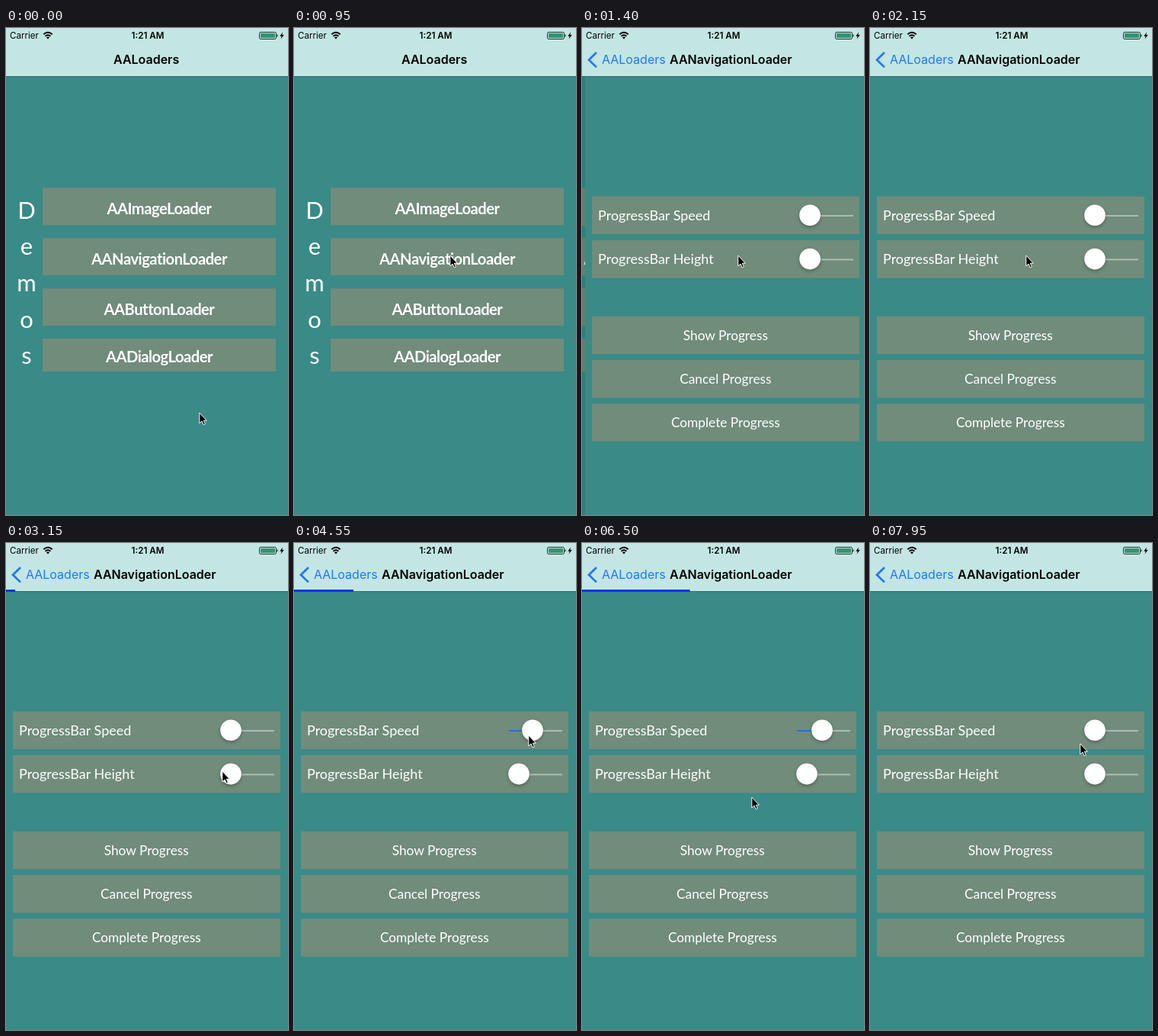
Animation of 370 by 638 pixels, one loop 8000 ms. Source, as an HTML page:

```html
<!DOCTYPE html>
<html lang="en">
<head>
<meta charset="utf-8">
<title>AALoaders</title>
<style>
  html, body { margin: 0; height: 100%; overflow: hidden; background: #3a8a88; }
  svg { display: block; width: 100vw; height: 100vh; }
  text { font: 16px Inter, sans-serif; }
  .mid { text-anchor: middle; }
  .bold { font-weight: 600; }
  .status { font-size: 11.6px; }
  .link { fill: #1c78f4; }
  .panel { fill: #718c7a; }
  .label { font: 18px Lato, sans-serif; fill: #fff; }
  .action { font-size: 17.3px; }
  .demo { font: 700 20.2px Lato, sans-serif; letter-spacing: -.5px; fill: #fff; }
  .letter { font: 400 31px Lato, sans-serif; fill: #fff; }
  .thumb { fill: #fff; filter: drop-shadow(0 2px 2px rgba(0, 0, 0, .28)); }
</style>
</head>
<body>
<svg viewBox="0 0 370 638">
  <rect width="370" height="638" fill="#3a8a88"/>
  <g id="home"></g>
  <rect id="dim" y="63" width="370" height="575"/>
  <g id="detail"><rect y="63" width="370" height="575" fill="#3a8a88"/></g>

  <rect width="370" height="63" fill="#c3e6e4"/>
  <rect y="63" width="370" height="1" fill="#356f6d"/>
  <rect id="bar" y="61" height="3" fill="#0936ea"/>

  <text class="status" x="5" y="14">Carrier</text>
  <path d="M49.3 8.3Q55 3.3 60.7 8.3M51.5 10.7Q55 7.7 58.5 10.7" fill="none" stroke="#000" stroke-width="1.8"/>
  <path d="M55 14.4L52.9 12.2Q55 10.6 57.1 12.2Z"/>
  <text class="status bold mid" x="186" y="14">1:21 AM</text>
  <rect x="332.5" y="5.5" width="22" height="9" rx="1.8" fill="none" stroke="#1c2d2b"/>
  <rect x="334" y="7" width="19" height="6" rx=".6" fill="#36936f"/>
  <path d="M355.5 8.3Q358 10 355.5 11.7Z"/>
  <path d="M363 5.5L359.3 10.7H361.6L360.6 14.5L364.7 9.1H362.3Z"/>

  <g id="back" class="link">
    <path d="M19 32L9 41.7L19 51.4" fill="none" stroke="#1c78f4" stroke-width="2.7"/>
    <text id="backText" y="47">AALoaders</text>
  </g>
  <text id="oldTitle" class="bold" y="47">AALoaders</text>
  <text id="newTitle" class="bold" y="47">AANavigationLoader</text>
  <path id="cursor" d="M.8 1V14.8L4 12L6.2 16.8L8.4 15.8L6.3 11.2H10.4Z" stroke="#fff"/>
</svg>
<script>
const LOOP = 8000, WIDTH = 370, TRAVEL = 350;
const PUSH = 1090, SHOW = 2895, CANCEL = 6000, SHOW_AGAIN = 6220, DONE = 7020;
const $ = id => document.getElementById(id);
const clamp = v => Math.min(1, Math.max(0, v));
const smooth = k => k * k * (3 - 2 * k);

function set(node, attrs) {
  for (const name in attrs) node.setAttribute(name, attrs[name]);
}
function add(parent, tag, attrs, text = "") {
  const node = document.createElementNS("http://www.w3.org/2000/svg", tag);
  set(node, attrs);
  node.textContent = text;
  return parent.appendChild(node);
}

[..."Demos"].forEach((letter, i) =>
  add($("home"), "text", { class: "letter mid", x: 27, y: 249.5 + i * 47.7 }, letter));

["Image", "Navigation", "Button", "Dialog"].forEach((kind, i) => {
  const y = 209.3 + i * 65.9, height = Math.min(49, 450 - y);
  add($("home"), "rect", { class: "panel", x: 48, y, width: 306, height });
  add($("home"), "text", { class: "demo mid", x: 201, y: y + height * .71 }, `AA${kind}Loader`);
});

function addRow(y, text, attrs) {
  add($("detail"), "rect", { class: "panel", x: 9, y, width: 351, height: 49.5 });
  add($("detail"), "text", { ...attrs, y: y + 31 }, text);
}
const sliders = ["Speed", "Height"].map((name, i) => {
  const y = 220.6 + i * 57.4, mid = y + 24.6;
  const line = { x: 282, y: mid - .2, height: 2 };
  addRow(y, `ProgressBar ${name}`, { class: "label", x: 17 });
  add($("detail"), "rect", { ...line, width: 70, fill: "#acbcb1" });
  return {
    fill: add($("detail"), "rect", { ...line, width: 0, fill: "#1c70ed" }),
    thumb: add($("detail"), "circle", { class: "thumb", cx: 295, cy: mid, r: 13.8 })
  };
});
["Show", "Cancel", "Complete"].forEach((verb, i) =>
  addRow(377.7 + i * 57.3, `${verb} Progress`, { class: "label action mid", x: 184.3 }));

// Places the pointer visits, with its time of arrival; it rests in between.
const visits = [
  { at: 0, x: 253, y: 503 },
  { at: 900, x: 204, y: 297 },
  { at: 2750, x: 196, y: 402 },
  { at: 3150, x: 283, y: 298 },
  { at: 4000, x: 289, y: 251 },
  { at: 4620, x: 309, y: 251 },
  { at: 5900, x: 201, y: 459 },
  { at: 6180, x: 212, y: 402 },
  { at: 6500, x: 222, y: 332 },
  { at: 6950, x: 309, y: 251 },
  { at: 7550, x: 289, y: 251 },
  { at: 7950, x: 275, y: 262 }
];
function pointerAt(t) {
  return visits.reduce((from, to) => {
    const k = smooth(clamp((t - to.at + TRAVEL) / TRAVEL));
    return { x: from.x + (to.x - from.x) * k, y: from.y + (to.y - from.y) * k };
  }, visits[0]);
}

// Critically damped spring used for the page push.
function pushAt(t) {
  const k = Math.max(0, t - PUSH) * .021;
  return 1 - Math.exp(-k) * (1 + k);
}

function barAt(t) {
  if (t >= SHOW && t < CANCEL) return (t - SHOW) * .0471;
  if (t >= SHOW_AGAIN && t < DONE) return Math.min(362, (t - SHOW_AGAIN) * .504);
  return 0;
}

// The slider is dragged right after the first show, and back again at the end.
function thumbAt(t) {
  const dragged = arrival => smooth(clamp((t - arrival + TRAVEL) / TRAVEL));
  return 295 + 20 * (dragged(4620) - dragged(7550));
}

function draw(t) {
  const p = pushAt(t), { x, y } = pointerAt(t), thumbX = thumbAt(t);
  set($("home"), { transform: `translate(${-.3 * WIDTH * p})` });
  set($("dim"), { opacity: p * .1 });
  set($("detail"), { transform: `translate(${WIDTH * (1 - p)})` });
  set($("bar"), { width: barAt(t) });

  // Titles settle just before the page does.
  const settle = clamp(p / .985), titleX = 141 - 115 * settle ** 1.2;
  set($("oldTitle"), { x: titleX, opacity: (1 - settle) ** 1.4 });
  set($("backText"), { x: titleX });
  set($("back"), { opacity: clamp((p - .65) / .33) });
  set($("newTitle"), { x: 115 + 299 * (1 - settle), opacity: p });

  set(sliders[0].thumb, { cx: thumbX });
  set(sliders[0].fill, { width: thumbX > 295 ? thumbX - 282 : 0 });
  set($("cursor"), { transform: `translate(${x} ${y})` });
}

const start = performance.now();
function tick() {
  draw((performance.now() - start) % LOOP);
  requestAnimationFrame(tick);
}
tick();
</script>
</body>
</html>
```
